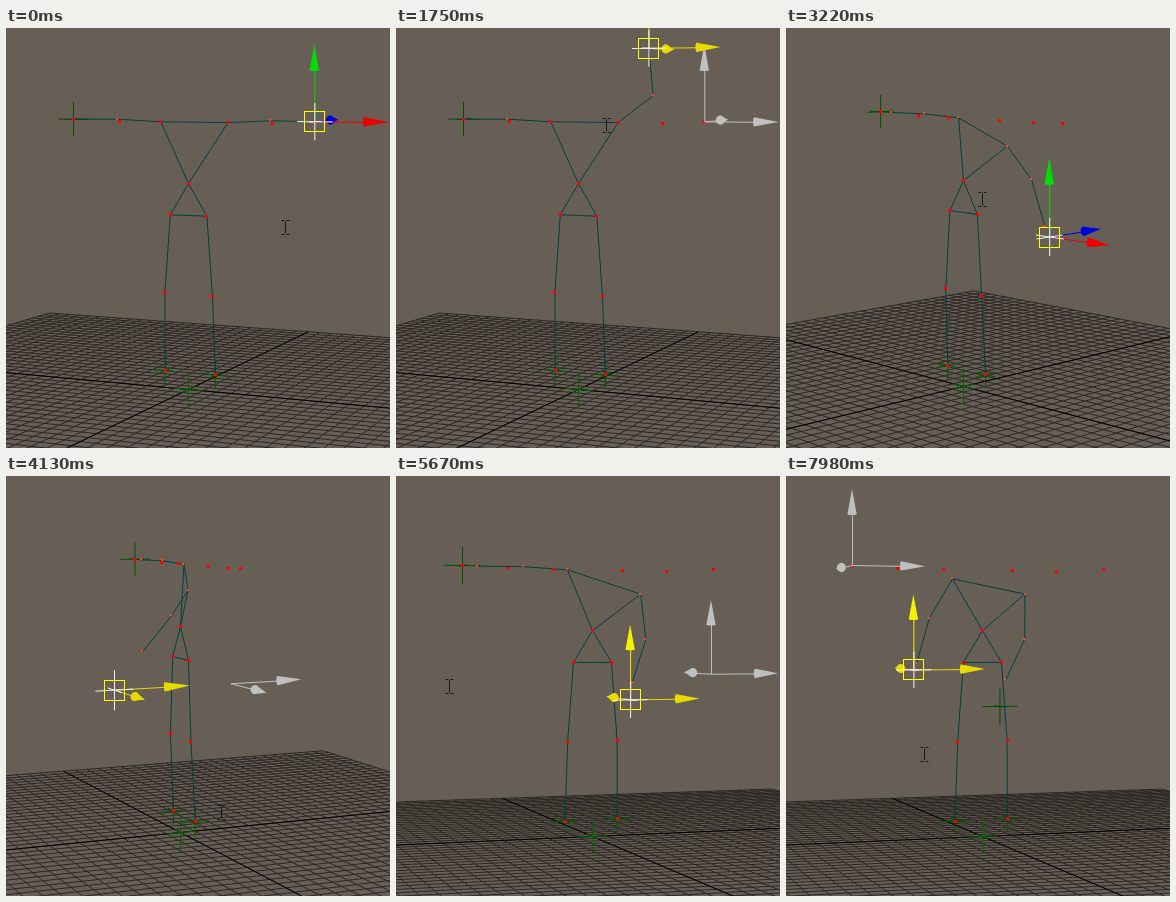
Write an HTML page with a canvas that moves like this. It is 384 px wide and 420 px high and loops after 8000 ms.

```html
<!DOCTYPE html>
<html lang="en">
<head>
<meta charset="utf-8">
<title>Rig posing</title>
<style>
html, body { margin: 0; width: 100%; height: 100%; overflow: hidden; background: #675f56; }
canvas { display: block; width: 384px; height: 420px; }
</style>
</head>
<body>
<canvas id="stage" width="384" height="420"></canvas>
<script>
const ctx = document.getElementById('stage').getContext('2d');
const LOOP = 8000, STEP = 70;
const CELLS = 24, SPAN = 365, PERSP = 0.0007, VX = 192;
const BONE = 47.5, ARM = 2 * BONE, AXIS = 74;
const SWITCH = 6300; // the selection moves from the right to the left hand

// Half of the resting figure, mirrored for the other side: x, height, depth
const REST = {
  hand: [132, 269, 3], elbow: [84, 267, 14], shoulder: [37, 267, 14],
  hip: [20, 174, 0], knee: [26, 95, 0], foot: [27.5, 16, 4]
};
const SPINE = [0, 206, 0], ROOT = [0, 0, 0];

// Time, yaw, horizon, root x, root y
const CAMERA = [
  [2870, 23.5, 57, 182, 361], [3220, 46, -2, 177, 358], [3640, 66, 32, 174, 356],
  [4550, 66, 32, 174, 356], [5110, -17.7, 165, 196, 360]
];
// Time and place of each hand's handle
const RIGHT = [
  [490, ...REST.hand], [1190, 105, 150, 0], [1330, 105, 150, 0], [1890, 68, 388, 0], [2030, 68, 388, 0],
  [2800, 118, 162, 0], [3710, 118, 162, 0], [3850, 118, 162, 70], [4230, 118, 162, -165],
  [4480, 118, 162, -25], [5250, 118, 162, -25], [5810, 10, 131, -25]
];
const LEFT = [
  [6550, -132, 269, 3], [7140, -107, 155, 0], [7560, -50, 320, 0], [7700, -50, 320, 0], [7980, -71, 167, 0]
];
// Time and cursor offset from the selected handle
const CURSOR = [
  [70, -29, 106], [350, -42, 77], [2800, -42, 77], [3220, -67, -38], [3710, 107, 122], [4480, 107, 122],
  [5110, -181, -13], [5950, -181, -13], [SWITCH - 1, -145, -134], [SWITCH, 0, 6], [6550, 11, 85]
];
const DRAGS = [
  { from: 280, to: 2870 }, { from: 3710, to: 4550, flat: true },
  { from: 5250, to: 5950 }, { from: 6550, to: LOOP }
];

const rad = d => d * Math.PI / 180;
const clamp = (v, lo, hi) => Math.min(hi, Math.max(lo, v));
const add = (a, b, k = 1) => a.map((v, i) => v + b[i] * k);
const dot = (a, b) => a.reduce((sum, v, i) => sum + v * b[i], 0);
const unit = a => a.map(v => v / Math.hypot(...a));
const mirror = ([x, y, z], side) => [x * side, y, z];
const ease = k => k - 0.05 * Math.sin(2 * Math.PI * k);

function track(keys, t) {
  const next = keys.findIndex(k => k[0] > t);
  if (next === 0) return keys[0].slice(1);
  if (next < 0) return keys[keys.length - 1].slice(1);
  const a = keys[next - 1], b = keys[next], k = ease((t - a[0]) / (b[0] - a[0]));
  return a.slice(1).map((v, i) => v + (b[i + 1] - v) * k);
}

function cameraAt(t) {
  const [yaw, hor, x, y] = track(CAMERA, t);
  const c = Math.cos(rad(yaw)), s = Math.sin(rad(yaw));
  return ([px, py, pz]) => {
    const w = 1 + PERSP * (pz * c - px * s);
    return [VX + (x - VX + px * c + pz * s) / w, hor + (y - hor - py) / w];
  };
}

// How hard an out-of-reach handle pulls on its shoulder, and which way
function pull(target, side) {
  const d = add(target, mirror(REST.shoulder, side), -1);
  const tug = clamp((Math.hypot(...d) - ARM) / 30, 0, 1), dir = unit(d);
  return { tug, rise: tug * clamp(dir[1] * 1.6, -1, 0.2), turn: tug * dir[2] };
}

// Two-link arm that bends outwards
function arm(shoulder, target, side, tug) {
  const d = add(target, shoulder, -1), dir = unit(d);
  const reach = Math.min(Math.hypot(...d), ARM - 2 * tug);
  const pole = [side, 0.3, 0], out = unit(add(pole, dir, -dot(pole, dir)));
  const bow = Math.sqrt(Math.max(0, BONE ** 2 - (reach / 2) ** 2));
  return {
    shoulder, elbow: add(add(shoulder, dir, reach / 2), out, bow), hand: add(shoulder, dir, reach)
  };
}

function poseAt(t) {
  const targets = [track(LEFT, t), track(RIGHT, t)];
  const pulls = targets.map((p, i) => pull(p, i ? 1 : -1));
  const lean = 15 * (pulls[0].rise - pulls[1].rise);
  return targets.map((p, i) => {
    const side = i ? 1 : -1, { tug, rise, turn } = pulls[i];
    const shoulder = add(mirror(REST.shoulder, side), [lean, 24 * rise, 40 * turn]);
    const half = arm(shoulder, p, side, tug);
    for (const j of ['hip', 'knee', 'foot']) half[j] = mirror(REST[j], side);
    return half;
  });
}

function path(...pts) {
  ctx.beginPath();
  for (const [x, y] of pts) ctx.lineTo(x + 0.5, y + 0.5);
  ctx.stroke();
}

function drawGrid(cam) {
  const pair = n => {
    path(cam([n, 0, -SPAN]), cam([n, 0, SPAN]));
    path(cam([-SPAN, 0, n]), cam([SPAN, 0, n]));
  };
  ctx.strokeStyle = '#2b2724';
  for (let i = -CELLS; i <= CELLS; i++) pair(i * SPAN / CELLS);
  ctx.strokeStyle = '#000';
  pair(0);
}

function locator(cam, p, color, size = 17, tall = size) {
  ctx.strokeStyle = color;
  for (const d of [[size, 0, 0], [0, tall, 0], [0, 0, size]]) path(cam(add(p, d, -1)), cam(add(p, d)));
}

function arrow(a, b, color) {
  const dx = b[0] - a[0], dy = b[1] - a[1], len = Math.hypot(dx, dy) || 1, r = 4.6;
  const x = a[0] + dx * 0.67, y = a[1] + dy * 0.67, nx = -dy / len * r, ny = dx / len * r;
  const thick = Math.max(1, r * Math.sqrt(Math.max(0, 1 - (len / (AXIS + 1)) ** 2)));
  ctx.strokeStyle = ctx.fillStyle = color;
  path(a, [x, y]);
  ctx.beginPath();
  ctx.moveTo(x + nx, y + ny);
  ctx.lineTo(...b);
  ctx.lineTo(x - nx, y - ny);
  ctx.fill();
  ctx.beginPath();
  ctx.ellipse(x, y, thick, r, Math.atan2(dy, dx), 0, 7);
  ctx.fill();
}

function gizmo(cam, p, colors, flat) {
  const ends = [[0, 0, AXIS], [AXIS, 0, 0], [0, AXIS, 0]];
  ends.slice(0, flat ? 2 : 3).forEach((d, i) => arrow(cam(p), cam(add(p, d)), colors[i]));
}

function marker([x, y], color, size) {
  ctx.fillStyle = color;
  ctx.fillRect(Math.round(x) - 1, Math.round(y) - 1, size, size);
}

function drawFigure(cam, halves) {
  ctx.strokeStyle = '#00403f';
  const [l, r] = halves;
  for (const h of halves) {
    path(...[h.hand, h.elbow, h.shoulder, SPINE, h.hip, h.knee, h.foot].map(cam));
  }
  path(cam(l.shoulder), cam(r.shoulder));
  path(cam(l.hip), cam(r.hip));
  for (const h of halves) for (const p of Object.values(h)) marker(cam(p), '#ff4a18', 2);
  for (const side of [-1, 1]) {
    for (const p of Object.values(REST)) marker(cam(mirror(p, side)), '#ff0000', 3);
  }
  marker(cam(SPINE), '#ff0000', 3);
}

function drawCursor([x, y]) {
  x = Math.round(x);
  y = Math.round(y);
  ctx.strokeStyle = '#10191c';
  path([x, y - 6], [x, y + 6]);
  for (const e of [-7, 7]) {
    path([x - 4, y + e], [x - 1, y + e]);
    path([x + 1, y + e], [x + 4, y + e]);
  }
}

function render(t) {
  const cam = cameraAt(t), halves = poseAt(t);
  const left = t >= SWITCH, keys = left ? LEFT : RIGHT;
  const handle = track(keys, t), drag = DRAGS.find(d => t >= d.from && t < d.to);
  const flat = drag && drag.flat;

  ctx.lineWidth = 1;
  ctx.fillStyle = '#675f56';
  ctx.fillRect(0, 0, 384, 420);
  drawGrid(cam);

  locator(cam, ROOT, '#006400', 16, 18);
  for (const h of halves) locator(cam, h.foot, '#005800', 15, 14);
  locator(cam, track(left ? RIGHT : LEFT, t), '#005000', 18);
  drawFigure(cam, halves);

  if (drag) gizmo(cam, track(keys, drag.from), Array(3).fill('#c0c0c0'), flat);
  gizmo(cam, handle, drag ? ['#e6da00', '#e6da00', '#f4f000'] : ['#0000dc', '#ec0000', '#00dc00'], flat);
  locator(cam, handle, '#f4f4f4', 18);
  const [x, y] = cam(handle);
  ctx.strokeStyle = '#ffff00';
  ctx.strokeRect(Math.round(x) - 9.5, Math.round(y) - 9.5, 20, 20);
  drawCursor(add([x, y], track(CURSOR, t)));
}

const start = performance.now();
function tick() {
  const t = (performance.now() - start) % LOOP;
  render(Math.floor(t / STEP) * STEP);
  requestAnimationFrame(tick);
}
tick();
</script>
</body>
</html>
```
